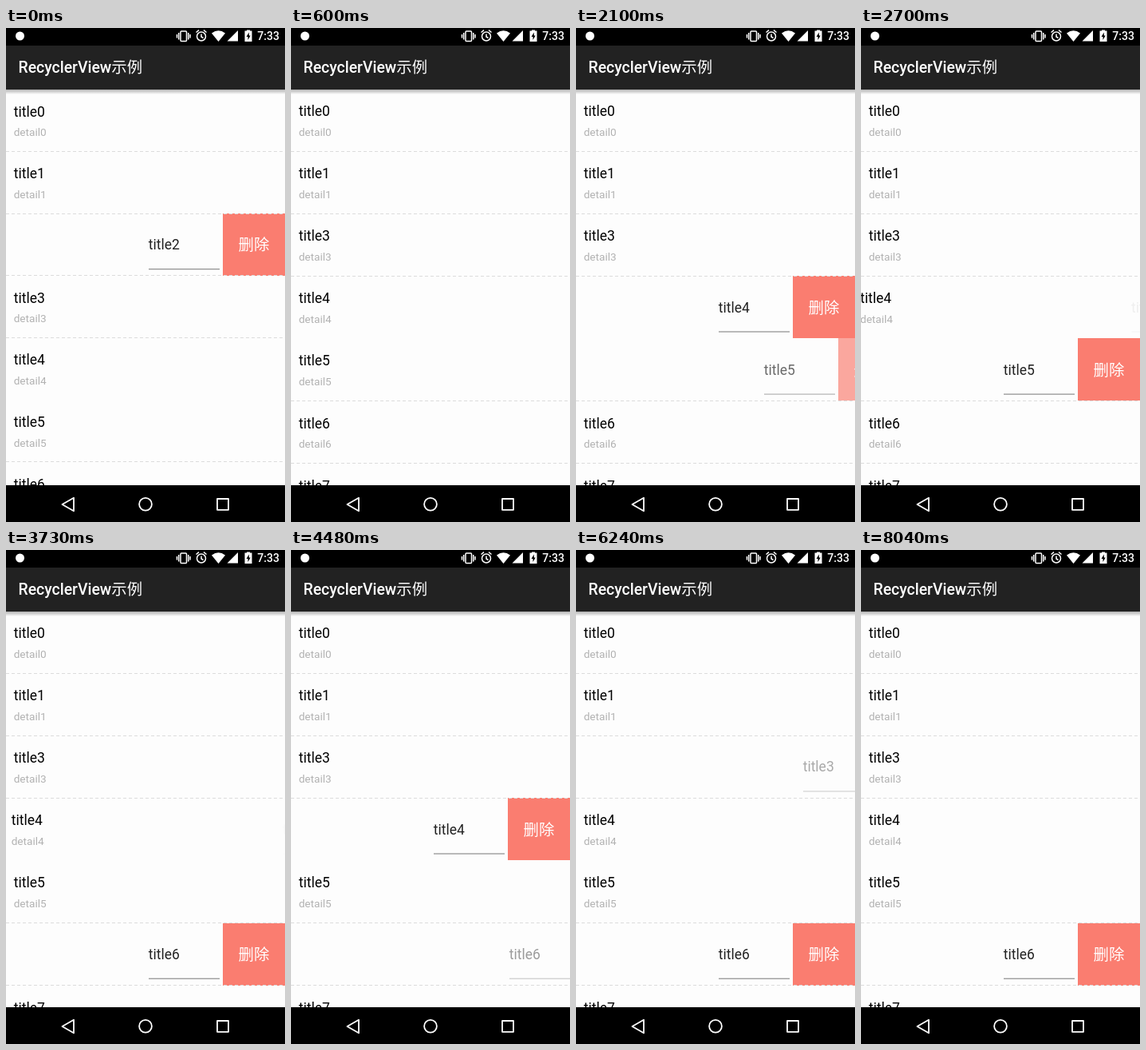
An HTML page for the animation above (8.14 s loop, 350 by 618 pixels).

```html
<!DOCTYPE html>
<html lang="zh-CN">
<head>
<meta charset="utf-8">
<style>
  html, body { margin: 0; width: 100%; height: 100%; overflow: hidden; background: #000; }
  svg { display: block; font-family: Roboto, "Noto Sans CJK SC", "Noto Sans CJK", sans-serif; }
  .title { font-size: 17.5px; fill: #000; }
  .detail { font-size: 13.6px; fill: #b2b2b2; }
  .edit { font-size: 17.5px; fill: #222; }
  .han { font-size: 19.4px; fill: #fff; font-weight: 400; }
  .rule { stroke: #dcdcdc; stroke-dasharray: 4 3; }
</style>
</head>
<body>
<svg width="350" height="618" viewBox="0 0 350 618">
  <defs>
    <linearGradient id="shade" x2="0" y2="1">
      <stop offset="0" stop-color="#000" stop-opacity=".3"/>
      <stop offset="1" stop-color="#000" stop-opacity="0"/>
    </linearGradient>
  </defs>
  <rect width="350" height="618" fill="#fdfdfd"/>
  <g id="rows"></g>
  <g id="rules"></g>

  <rect y="77" width="350" height="6" fill="url(#shade)"/>
  <rect y="22" width="350" height="55" fill="#222"/>
  <text x="15.6" y="56" font-size="19.4" font-weight="500" fill="#fff">RecyclerView<tspan class="han">示例</tspan></text>

  <rect width="350" height="22" fill="#000"/>
  <g fill="#fff">
    <circle cx="17.5" cy="10" r="5.5"/>
    <path d="M258 6.5Q266.500 0 275 6.500L266.500 17Z"/>
    <path d="M291 3V16.500H277.500Z"/>
    <path d="M302 3.500V2.500H306V3.500H308.500V17H299.500V3.500Z"/>
    <text x="315.300" y="15" font-size="14" font-weight="500">7:33</text>
  </g>
  <path d="M304.800 5.500L301.500 11H303.500V15L306.700 9.500H304.800Z" fill="#000"/>
  <g fill="none" stroke="#fff" stroke-width="1.5">
    <rect x="219" y="4" width="7.500" height="12.500" rx="1"/>
    <path d="M216.700 6V14.500M228.800 6V14.500M214.500 8V12.500M231 8V12.500"/>
    <circle cx="245" cy="10.500" r="5.500"/>
    <path d="M245 7.500V11L247.500 12.500M238.500 5.500L242 2.700M248 2.700L251.500 5.500"/>
  </g>

  <rect y="572" width="350" height="46" fill="#000"/>
  <g fill="none" stroke="#fff" stroke-width="1.8" stroke-linejoin="round">
    <path d="M70.500 596L85 587.700V604.300Z"/>
    <circle cx="175" cy="595.700" r="7.900"/>
    <rect x="265" y="589" width="14" height="13.800"/>
  </g>
</svg>
<script>
const LOOP = 8140, REACH = 171, REMOVED = 2;

// Screen refreshes: [first, last, count]
const bursts = [
  [0, 600, 5], [1050, 1500, 4], [1950, 2850, 7], [3000, 3600, 5],
  [3730, 5080, 10], [5220, 5360, 2], [5660, 6390, 6]
];
const ticks = bursts.flatMap(([a, b, n]) =>
  Array.from({ length: n }, (_, i) => a + (b - a) * i / (n - 1)));

// Swipes: [row, start, duration, opens]
const swipes = [
  [4, 900, 600, 1], [5, 1800, 450, 1], [4, 2250, 600, 0],
  [4, 2850, 300, 1], [5, 3150, 150, 0], [6, 3300, 300, 1], [4, 3500, 265, 0],
  [4, 3880, 450, 1], [6, 4330, 450, 0], [3, 4630, 450, 1], [4, 4930, 390, 0],
  [6, 5510, 450, 1], [3, 5960, 360, 0]
];

const clamp = v => Math.max(0, Math.min(1, v));
const mix = (a, b, k) => a + (b - a) * k;
const smooth = u => u * u * (3 - 2 * u);

function add(parent, tag, attrs, text) {
  const el = document.createElementNS("http://www.w3.org/2000/svg", tag);
  for (const key in attrs) el.setAttribute(key, attrs[key]);
  if (text) el.textContent = text;
  return parent.appendChild(el);
}

function makeRow(i) {
  const row = add(document.getElementById("rows"), "g", {});
  const content = add(row, "g", {});
  add(content, "text", { class: "title", x: 9.7, y: 34 }, "title" + i);
  add(content, "text", { class: "detail", x: 9.7, y: 58.8 }, "detail" + i);
  const panel = add(row, "g", {});
  add(panel, "text", { class: "edit", x: 178.7, y: 45.3 }, "title" + i);
  add(panel, "rect", { x: 179, y: 69.2, width: 89, height: 1, fill: "#777" });
  add(panel, "rect", { x: 272, width: 78, height: 78, fill: "#fa7d70", "shape-rendering": "crispEdges" });
  add(panel, "text", { class: "han", x: 311, y: 46.3, "text-anchor": "middle" }, "删除");
  // Rows 4 and 5 have no visible divider between them
  const rule = i === 4 ? null : add(document.getElementById("rules"), "path", { class: "rule", d: "M0 .5H350" });
  return { row, content, panel, rule };
}

const rows = Array.from({ length: 8 }, (_, i) => makeRow(i));

function openness(i, t) {
  let p = i === REMOVED ? 1 : 0;
  for (const [row, start, duration, opens] of swipes) {
    if (row !== i || t < start) continue;
    const u = clamp((t - start) / duration);
    p = opens ? u : (1 - u) ** 2;
  }
  return p;
}

function draw(t) {
  const fade = 1 - clamp(t / 300);
  const shift = smooth(clamp((t - 300) / 300));
  const topOf = i => mix(76.7 + 77.65 * i, 76 + 78.1 * (i > REMOVED ? i - 1 : i), shift);

  rows.forEach(({ row, content, panel, rule }, i) => {
    const p = openness(i, t), top = topOf(i);
    const alpha = i === REMOVED ? fade : 1;
    row.setAttribute("transform", `translate(0 ${top})`);
    row.setAttribute("opacity", alpha);
    content.setAttribute("transform", `translate(${-REACH * p} 0)`);
    panel.setAttribute("transform", `translate(${REACH * (1 - p)} 0)`);
    panel.setAttribute("opacity", p);
    if (!rule) return;
    const height = mix(77.65, 78.1, shift);
    rule.setAttribute("transform", `translate(0 ${Math.floor(top + height + 0.01)})`);
    rule.setAttribute("opacity", alpha > 0 ? 1 : 0);
  });
}

function frame() {
  const t = performance.now() % LOOP;
  draw(ticks.filter(k => k <= t).pop());
  requestAnimationFrame(frame);
}
frame();
</script>
</body>
</html>
```
